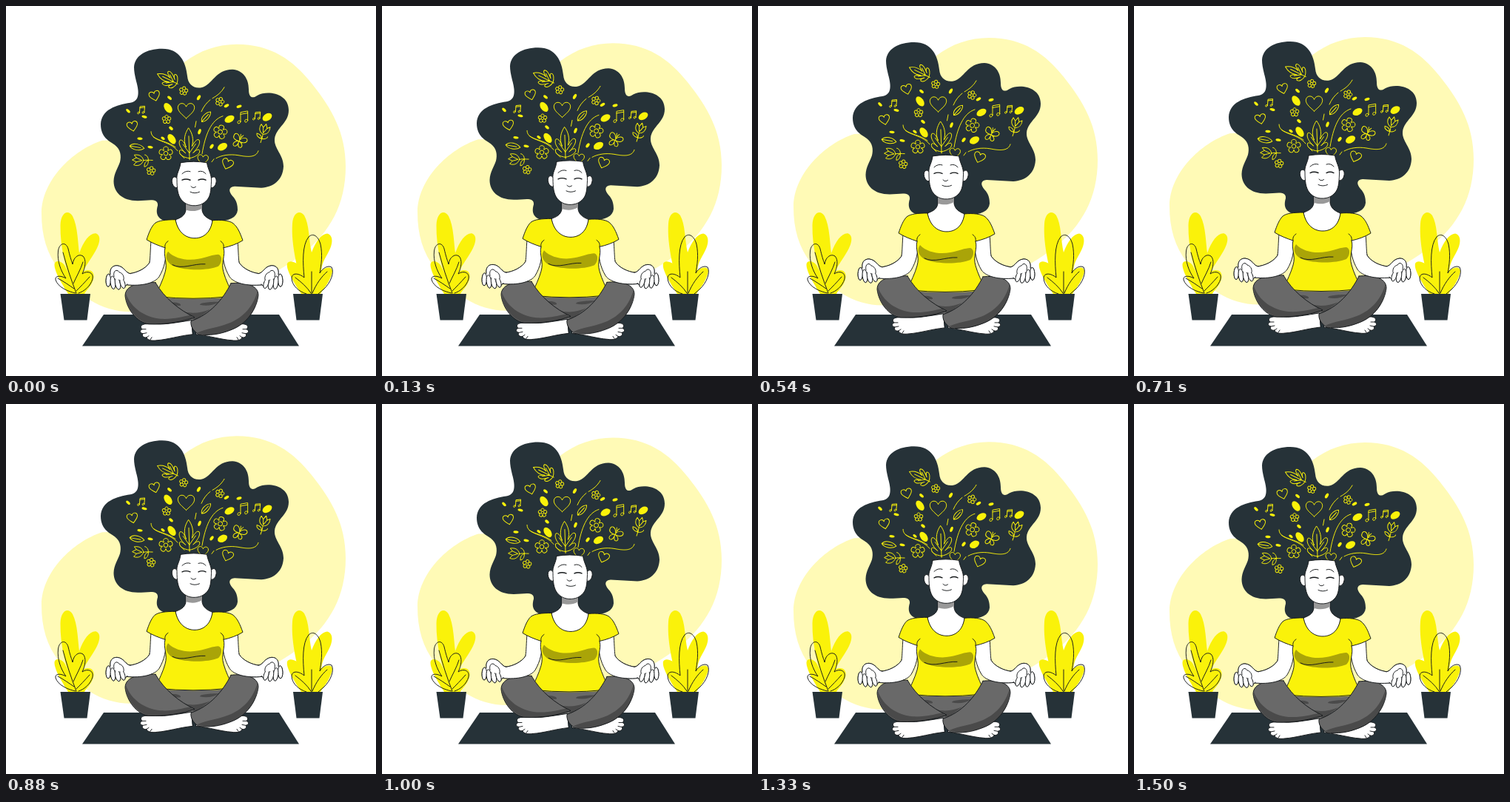
Recreate the animation shown at these times as an HTML page with a canvas. Size 500 by 500 pixels, loop 1.54 s.

```html
<!DOCTYPE html>
<html lang="en">
<head>
<meta charset="utf-8">
<title>Floating meditation</title>
<style>
html, body { margin: 0; width: 100%; height: 100%; overflow: hidden; background: #fff; }
canvas { display: block; width: 500px; height: 500px; }
</style>
</head>
<body>
<canvas id="stage"></canvas>
<script>
const FRAME = 1000 / 24, FRAMES = 37, LOOP = 1540, LIFT = 10, TOP_FRAME = 16.6;
const INK = '#263238', LINE = '#16191b', YELLOW = '#faf20a', PALE = '#fffab6';
const GREY = '#696969', SHADE = '#4a4a4a', WHITE = '#fff', OLIVE = '#aaa408';

const canvas = document.getElementById('stage');
const ctx = canvas.getContext('2d');
const ratio = window.devicePixelRatio || 1;
canvas.width = canvas.height = 500 * ratio;

function shape(d, fill, stroke, width = 0.95) {
  const path = new Path2D(d);
  if (fill) { ctx.fillStyle = fill; ctx.fill(path); }
  if (stroke) { ctx.strokeStyle = stroke; ctx.lineWidth = width; ctx.stroke(path); }
}

function ellipse(x, y, rx, ry, degrees, fill, stroke) {
  ctx.beginPath();
  ctx.ellipse(x, y, rx, ry, degrees * Math.PI / 180, 0, Math.PI * 2);
  if (fill) { ctx.fillStyle = fill; ctx.fill(); }
  if (stroke) { ctx.strokeStyle = stroke; ctx.lineWidth = 0.95; ctx.stroke(); }
}

function at(x, y, degrees, scale, draw) {
  ctx.save();
  ctx.translate(x, y);
  ctx.rotate(degrees * Math.PI / 180);
  ctx.scale(scale, scale);
  draw(0.95 / scale);
  ctx.restore();
}

// Draws on both sides of the body's vertical axis.
function bothSides(draw) {
  draw();
  ctx.save();
  ctx.translate(509, 0);
  ctx.scale(-1, 1);
  draw();
  ctx.restore();
}

const heart = w => shape('M0 9 C-4 5-10 1-10-4 C-10-10-2-11 0-5 C2-11 10-10 10-4 C10 1 4 5 0 9Z', null, YELLOW, w);

function flower(w) {
  for (let i = 0; i < 5; i++) {
    ctx.rotate(Math.PI * 0.4);
    shape('M-2.4-3.8 C-6-10 6-10 2.4-3.8', null, YELLOW, w);
  }
  shape('M2.6 0 A2.6 2.6 0 1 1-2.6 0 A2.6 2.6 0 1 1 2.6 0', null, YELLOW, w);
}

function notes(w) {
  shape('M-4 6 V-8 L7-10 V4 M-4-5 L7-7', null, YELLOW, w);
  shape('M-4 6 C-6 3-10 6-8 9 C-6 10-4 8-4 6Z M7 4 C5 1 1 4 3 7 C5 8 7 6 7 4Z', null, YELLOW, w);
}

const leaf = w => shape('M-10 0 C-6-6 5-5 10 0 C5 5-6 5-10 0Z M-10 0 H5', null, YELLOW, w);

const oakLeaf = w => shape(
  'M0 0 C-7-1-15-5-13-11 C-11-13-7-9-5-7 C-12-14-15-21-12-25 C-8-26-6-20-4-15 C-8-25-5-34 0-41' +
  ' C5-34 7-25 4-16 C7-21 11-27 14-24 C16-19 10-12 5-7 C8-10 13-13 14-10 C15-5 7-1 0 0Z' +
  ' M0 2 V-30 M0-7 L-8-19 M0-7 L9-19', null, YELLOW, w);

const tulip = w => shape(
  'M0 4 C-8 1-8-6-6-10 L-2-6 L1-12 L4-6 L8-9 C9-2 6 3 0 4Z M-2-6 L0 2 L4-6 M0 4 C1 9 0 13 0 17' +
  ' M0 11 C-6 11-9 8-9 5 C-4 5-1 7 0 11 C5 11 8 8 8 6', null, YELLOW, w);

const butterfly = w => shape(
  'M0 5 L0-5 M0-2 C-4-11-11-10-10-4 C-10 0-5 1 0 0 C-6 1-8 8-4 9 C-1 9 0 5 0 2' +
  ' C1 7 3 9 6 7 C8 4 5 1 0 0 C6 1 11-2 10-6 C8-10 2-7 0-2 M0-5 L-2-10 M0-5 L2-10', null, YELLOW, w);

// x, y, long radius, short radius, angle
const seeds = [
  [219, 138, 7.5, 4.6, 55], [302, 153, 7, 4.4, -28], [353, 150.5, 7, 4.6, -32],
  [292.5, 190.5, 7, 4.6, -28], [224, 180, 7.5, 4.5, 55], [165, 142, 3.4, 1.8, 45],
  [187, 150, 3.6, 1.7, 15], [181, 179.5, 3.6, 1.7, 5], [195, 191, 3.6, 1.7, 10],
  [221, 124.5, 3.4, 1.8, 40], [260.5, 124, 3.8, 2, -60], [223, 165.5, 3.2, 1.9, 40],
  [212, 179, 3, 1.7, 35], [298, 135, 3.6, 1.9, -30], [315, 136, 3.6, 1.9, -15],
  [261.5, 170, 3.8, 1.9, -70], [278, 190, 3.5, 2, -55]
];

// drawing, x, y, angle, scale
const icons = [
  [heart, 201, 122, -15, 0.72], [heart, 243.5, 142, 0, 1.12], [heart, 171, 163, -12, 0.72],
  [heart, 299, 214, 20, 0.76], [heart, 266, 208, 5, 0.72],
  [flower, 240, 115, 10, 0.68], [flower, 289, 129.5, 20, 0.7], [flower, 217, 153.5, 0, 0.7],
  [flower, 196, 223, 10, 0.7], [flower, 216, 199.5, 0, 1.1], [flower, 289.5, 170.5, 15, 1.12],
  [notes, 183, 141, 5, 0.58], [notes, 320.5, 151, 0, 0.88], [notes, 339, 149, 5, 0.6],
  [leaf, 270.5, 150, -48, 0.9], [leaf, 177, 191, 10, 1],
  [oakLeaf, 231, 105, -64, 0.72], [oakLeaf, 248, 206, -2, 1],
  [tulip, 348, 170, 15, 0.9], [tulip, 182, 209, -91, 0.95], [butterfly, 315, 183, 25, 0.95]
];

function drawBackdrop() {
  shape('M130 182 C90 195 48 236 48 281 C48 310 55 335 72 357 C95 390 128 414 170 413.5' +
    ' C235 412 290 400 330 379 C358 363 379 352 400 336 C438 306 459 268 459 217' +
    ' C459 171 440 139 414 106 C388 73 358 52 312 52 C286 52 262 60 240 77 L215 180Z', PALE);
}

function drawMat() {
  shape('M132 417 H369 L396 459.5 H103Z', INK);
}

function drawLeftPlant() {
  shape('M95 389 C81 358 73 327 73.5 296 C74 279 84 274 90 284 C97 298 97 319 99 334' +
    ' C105 317 114 306 122 307.5 C130 311 126 324 118 336 C112 346 107 352 104 359' +
    ' C113 354 121 359 118 369 C115 380 108 384 106 389Z', YELLOW);
  shape('M84 389 C75 375 65 358 65.5 349 C66 343 74 344 79 350 L98 389Z', YELLOW);
  shape('M94 388 C84 386 70 380 67 370 C66 364 74 364 81 368 C74 358 69 345 70.5 331' +
    ' C72 320 81 318 84 328 C86 337 88 343 90 349 C91 340 98 334 104 338 C109 343 107 354 103 362' +
    ' C110 357 119 360 117 369 C114 379 105 386 98 388 M77 333 C82 352 88 370 95 388' +
    ' M104 346 C101 356 95 366 91 375 M70 368 C78 372 86 378 92 382' +
    ' M113 366 C106 374 100 380 95 385', null, LINE);
  shape('M73.5 389 H114 L109.5 424.5 H78.5Z', INK);
}

function drawRightPlant() {
  shape('M401 389 C394 352 385 324 387 294 C388 279 397 275 403 283 C410 295 409 316 413 333' +
    ' C418 319 426 308 434 307.5 C443 310 442 322 435 334 C428 346 427 350 426 358' +
    ' C433 352 441 352 441 359 C438 373 429 382 425 389Z', YELLOW);
  shape('M399 389 C389 374 378 356 380 348 C383 342 394 347 400 354 L410 389Z', YELLOW);
  shape('M406 389 C396 386 386 378 386 367 C387 360 396 361 403 367 C401 347 400 323 409 312' +
    ' C415 306 422 311 425 322 C428 336 426 350 424 361 C428 354 435 350 440 353' +
    ' C444 360 439 374 429 383 L422 389 M413 359 V389 M391 367 C399 373 407 380 412 388' +
    ' M434 359 C426 366 419 376 414 388', null, LINE);
  shape('M388 389 H428 L423.5 424.5 H392.5Z', INK);
}

function drawHair() {
  shape('M218 291 C204 289 202 280 205 270 C206 259 192 263.5 178 263.5 C157 263.5 145.5 252 145.5 237' +
    ' C146 226 151 220 154 211 C156 203 155 194 147 188 C140 183 128 178 128 160' +
    ' C129 140 149 134 168 131 C181 129 180 116 176 102 C174 94 173 88 173 83' +
    ' C174 67 190 58 211 58 C235 58 243 76 245 95 C246 106 253 112 264 110.5' +
    ' C279 107 283 86 306 86 C320 87 328 98 328 113' +
    ' C328 124 333 126 340 121 C353 114 382 118 382 141 C382 159 365 164 363 180' +
    ' C362 193 375 201 375 217 C374 236 361 245 345 246 L309 244' +
    ' C300 245 301 251 306 257 C312 263 313 270 313 276 C312 287 300 292 278 291Z', INK);
  shape('M295 110 C291 117 286 121 279 125 M276 127 C271 131 267 136 264 143 M257 156 L255.5 164' +
    ' M293 149 C277 154 269 175 265 200 M341 196 C338 206 325 204 314 202 C302 200 291 202 284 206' +
    ' M281 207 L278 211 M196 170 C196 184 220 181 232 196 M199 177 C207 183 218 183 229 191 M235 200 L241 206',
    null, YELLOW);
  for (const [x, y, rx, ry, angle] of seeds) ellipse(x, y, rx, ry, angle, YELLOW);
  for (const [icon, x, y, angle, scale] of icons) at(x, y, angle, scale, icon);
}

function drawHead() {
  shape('M243 263 V276 C242 284 235 287 229 289 C231 305 243 316 255 316 C268 316 278 304 279 290' +
    ' C271 287 266 283 265 276 V263Z', WHITE, LINE);
  shape('M243.5 263 H264.5 V274 C258 278 250 278 243.5 276Z', '#999');
  ellipse(229, 238.5, 4.5, 7.5, -15, WHITE, LINE);
  ellipse(279.5, 238.5, 4.5, 7.5, 15, WHITE, LINE);
  shape('M236 212 Q254 209 271.5 212 C273 222 278 227 277.5 237 C277 251 276 257 272 262' +
    ' C267 268 261 270 254 270 C247 270 241 267 237 262 C232 256 231 246 231 235 C230 226 235 222 236 212Z',
    WHITE, LINE);
  shape('M238 235.5 Q243 233 249 235.5 M260 235.5 Q265 233 270 235.5', null, LINE, 1.4);
  shape('M238 227 Q243 222 249 224 M260 224 Q266 222 270 227' +
    ' M250 244 Q253 247.5 256.5 244.5 M249 251.5 Q255 254.5 261.5 251.5', null, LINE);
}

function drawArm() {
  shape('M196 317 C195 330 195 340 194 347 C189 355 177 361 166 362 L163 377' +
    ' C183 379 201 375 207 366 C214 354 217 342 216 324Z', WHITE, LINE);
  shape('M168 362 C161 361 160 352 150 351 C143 351 140 356 141 362 L140 372 C147 382 157 382 164 376Z', WHITE);
  shape('M168 362 C161 361 160 352 150 351 C143 351 140 356 141 363 M164 376 L161 379', null, LINE);
  ellipse(138.3, 371, 3.2, 8.5, 2, WHITE, LINE);
  ellipse(144.5, 374, 3.3, 8.8, -7, WHITE, LINE);
  ellipse(151, 375.5, 3.4, 8, -13, WHITE, LINE);
  ellipse(157.5, 375, 3.1, 7, -18, WHITE, LINE);
  shape('M146 365 C144 358 150 355 153 360 C157 361 160 366 158 371 L148 369Z', WHITE);
  shape('M146 366 C144 358 150 355 153 360 C157 361 160 365 159 370', null, LINE);
}

function drawShirt() {
  shape('M229 289 C216 289 206 290 201 294 C196 299 193 307 190 316 C198 321 206 324 215 327' +
    ' C212 338 219 347 215 360 C212 371 207 380 203 390 L215 402 H294 L306 390' +
    ' C302 380 297 371 294 360 C290 347 297 338 294 327' +
    ' C303 325 312 322 320 317 C316 306 313 299 307 294 C302 290 290 289 279 290' +
    ' C277 305 268 314 255 314 C242 314 232 305 229 289Z', YELLOW, LINE);
  shape('M219 332 C228 342 246 345 260 342 C271 340 280 336 287 336 C293 338 292 347 287 352' +
    ' C272 358 244 358 227 352 C217 348 214 338 219 332Z', OLIVE);
  shape('M225 350 C238 357 253 348 269 349 M215 327 C214 323 216 320 219 318' +
    ' M294 327 C295 323 293 320 290 318', null, LINE);
}

function drawFoot() {
  shape('M250 425 C230 428 215 431 203 430 L188 430 C182 431 181 434 184 437 C180 439 181 442 185 443' +
    ' C183 446 186 449 190 448 C191 452 197 453 204 452 C219 451 233 446 252 444Z', WHITE, LINE);
  shape('M184 437 L189 437 M185 443 L190 442 M190 448 L193 446 M195 451 L197 448', null, LINE);
}

function drawLegs() {
  shape('M205 394 Q253 398 303 394 L262 431 H245Z', GREY);
  shape('M206 393 Q253 398 300 393', null, LINE);
  shape('M222 401 C230 400 237 402 236 405 C230 406 225 404 222 401Z' +
    ' M288 400 C275 400 262 401 262 404 C270 406 281 405 288 400Z M235 412 Q255 419 276 410 L256 425Z', SHADE);
  bothSides(drawFoot);
  const thigh = 'M202 374 C181 373 161 377 161 392 C163 410 177 428 193 430 C215 431 238 427 255 421' +
    ' C234 411 214 395 202 374Z';
  shape(thigh, GREY);
  shape('M162 389 C169 408 187 421 209 423 C226 424 238 420 249 418 L253 422' +
    ' C230 429 205 432 191 429 C175 424 162 407 162 389Z', SHADE);
  shape(thigh, null, LINE);
  const shin = 'M304 375 C322 373 341 377 341 391 C339 409 326 430 304 438 C289 444 275 446 260 444' +
    ' C253 439 249 433 250 426 C276 417 293 397 304 375Z';
  shape(shin, GREY);
  shape('M340 385 C335 404 322 421 301 429 C286 435 271 436 258 442 C275 447 291 443 304 438' +
    ' C326 430 341 409 340 385Z', SHADE);
  shape(shin, null, LINE);
}

function render(now) {
  const frame = Math.floor((now % LOOP + 5) / FRAME) % FRAMES;
  const phase = (frame - TOP_FRAME) / FRAMES * Math.PI * 2;
  const rise = -LIFT * (1 + Math.cos(phase)) / 2;

  ctx.setTransform(ratio, 0, 0, ratio, 0, 0);
  ctx.lineCap = ctx.lineJoin = 'round';
  ctx.fillStyle = WHITE;
  ctx.fillRect(0, 0, 500, 500);

  const floating = draw => {
    ctx.save();
    ctx.translate(0, rise);
    draw();
    ctx.restore();
  };
  floating(drawBackdrop);
  drawMat();
  drawLeftPlant();
  drawRightPlant();
  floating(() => {
    drawHair();
    drawHead();
    bothSides(drawArm);
    drawShirt();
    drawLegs();
    // The hands rest on the knees.
    ctx.save();
    ctx.beginPath();
    ctx.rect(130, 345, 66, 45);
    ctx.rect(313, 345, 66, 45);
    ctx.clip();
    bothSides(drawArm);
    ctx.restore();
  });
}

let start;
function tick(now) {
  start ??= now;
  render(now - start);
  requestAnimationFrame(tick);
}
render(0);
requestAnimationFrame(tick);
</script>
</body>
</html>
```
